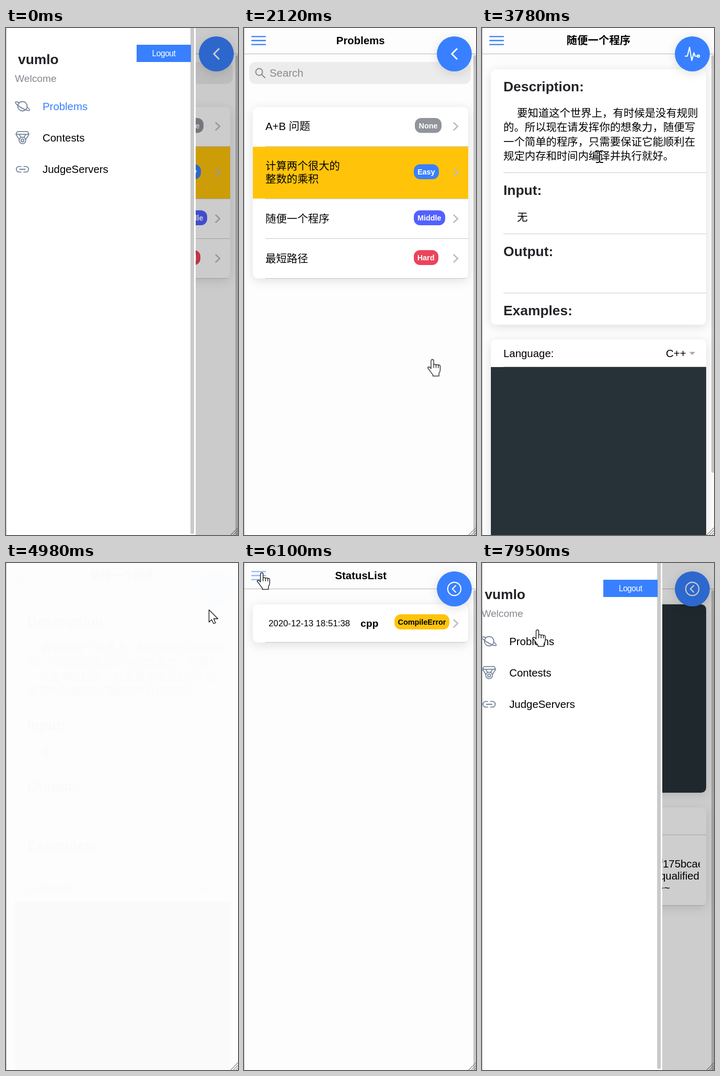
An HTML page that plays this animation: 444x969 px, repeating every 8 s.

```html
<!DOCTYPE html>
<html lang="zh-CN">
<head>
<meta charset="utf-8">
<title>Judge</title>
<style>
html, body { margin: 0; width: 100%; height: 100%; overflow: hidden; background: #fdfdfd; }
svg { display: block; }
text { font: 20.4px "Liberation Sans", Arial, "Noto Sans CJK SC", "Noto Sans CJK", sans-serif; white-space: pre; }
.b { font-weight: 700; }
.h { font-size: 26.4px; font-weight: 700; fill: #222428; }
.title { font-weight: 700; text-anchor: middle; }
.badge { font-size: 14.4px; font-weight: 700; fill: #fff; }
.card { fill: #fff; filter: drop-shadow(0 4.8px 9.6px rgba(0, 0, 0, .12)); }
.sep { fill: none; stroke: #c8c8ca; }
.line { fill: none; stroke-linecap: round; stroke-linejoin: round; }
.cursor path { fill: #fff; stroke: #111; stroke-width: 1.3; stroke-linejoin: round; }
</style>
</head>
<body>
<svg width="444" height="969" viewBox="0 0 444 969">
  <defs>
    <path id="bars" class="line" d="M15 16.3h26M15 24h26M15 31.7h26" stroke="#3880ff" stroke-width="2.3"/>
    <circle id="fab" class="card" cx="402.5" cy="49.5" r="33.5" style="fill:#3880ff"/>
    <path id="more" class="line" d="M-4-7L3.5 0L-4 7" stroke="#bdbdc0" stroke-width="2.5"/>
    <g id="back" class="line" stroke="#fff" stroke-width="32" transform="translate(385.7 32.7) scale(.0656)">
      <circle cx="256" cy="256" r="192"/><path d="M296 352l-96-96 96-96"/>
    </g>
    <clipPath id="msg"><path d="M41 520h376v134H41z"/></clipPath>
  </defs>

  <rect width="444" height="969" fill="#fdfdfd"/>
  <g id="chrome">
    <path d="M0 49.5h444" stroke="#b5b5b6"/>
    <rect id="bar" x="439" y="52" width="8" height="925" rx="3" fill="#c8c8c8"/>
  </g>

  <g id="list">
    <text class="title" x="223" y="31">Problems</text>
    <use href="#bars"/>
    <rect x="10" y="65" width="424" height="42" rx="12" fill="#ececed"/>
    <g class="line" stroke="#8a8a8d" stroke-width="2"><circle cx="29" cy="84" r="6.5"/><path d="M34 89l6 6"/></g>
    <text x="49" y="93" fill="#8a8a8d">Search</text>
    <rect class="card" x="17" y="151" width="412" height="327.500" rx="9.600"/>
    <path d="M17 227h412v99H17z" fill="#ffc409"/>
    <path class="sep" d="M41 226.500h388M41 326.500h388M41 402.500h388M41 478.500h383"/>
    <g id="rows"></g>
    <use href="#fab"/>
    <path class="line" d="M407.200 40L397.800 49.500L407.200 59" stroke="#fff" stroke-width="3"/>
  </g>

  <g id="problem">
    <text class="title" x="223" y="31">随便一个程序</text>
    <use href="#bars"/>
    <rect class="card" x="17" y="79" width="412" height="488" rx="9.600"/>
    <text class="h" x="41" y="121">Description:</text>
    <text x="67" y="169.500">要知道这个世界上，有时候是没有规则</text>
    <text x="41" y="197">的。所以现在请发挥你的想象力，随便写</text>
    <text x="41" y="224.500">一个简单的程序，只需要保证它能顺利在</text>
    <text x="41" y="251.500">规定内存和时间内编译并执行就好。</text>
    <text class="h" x="41" y="319">Input:</text>
    <text x="67" y="369">无</text>
    <text class="h" x="41" y="436">Output:</text>
    <text class="h" x="41" y="549">Examples:</text>
    <path class="sep" d="M41 276.500h388M41 393.500h388M41 506.500h388"/>
    <rect class="card" x="17" y="595" width="412" height="400" rx="9.600"/>
    <text x="41" y="629">Language:</text>
    <text x="352" y="629">C++</text>
    <path d="M397 619h11l-5.500 6z" fill="#aaa"/>
    <path class="sep" d="M41 647.500h388"/>
    <path d="M17 648h412v321H17z" fill="#263238"/>
    <use href="#fab"/>
    <g class="line" stroke="#fff" stroke-width="32" transform="translate(385.700 32.700) scale(.0656)">
      <path d="M48 320h64l64-256 64 384 64-224 32 96h64"/><circle cx="432" cy="320" r="32"/>
    </g>
  </g>

  <g id="status">
    <text class="title" x="223.500" y="31">StatusList</text>
    <use id="hover" href="#bars"/>
    <rect class="card" x="17" y="79" width="412" height="73" rx="9.600"/>
    <path class="sep" d="M41 151.500h383"/>
    <text x="47" y="121" style="font-size:16.800px">2020-12-13 18:51:38</text>
    <text class="b" x="223" y="122" style="font-size:19.200px">cpp</text>
    <rect x="288" y="98" width="105" height="29" rx="12" fill="#ffc409"/>
    <text class="badge" x="294.500" y="118" style="fill:#000">CompileError</text>
    <use href="#more" x="405.500" y="115.500"/>
    <use href="#fab"/><use href="#back"/>
  </g>

  <g id="detail">
    <text class="title" x="223" y="31">Status</text>
    <use href="#bars"/>
    <g id="result">
      <rect class="card" x="17" y="79" width="412" height="360" rx="9.600" style="fill:#263238"/>
      <rect class="card" x="17" y="467" width="412" height="188" rx="9.600"/>
      <path class="sep" d="M41 519.500h388M41 654.500h383"/>
      <text x="41" y="501">Message:</text>
      <g clip-path="url(#msg)">
        <text x="346" y="582" text-anchor="end">/judger/run/d40f</text><text x="346" y="582">175bcae02</text>
        <text x="340" y="605" text-anchor="end">1:1: error: expected un</text><text x="340" y="605">qualified</text>
        <text x="360" y="628" text-anchor="end">^~~~~~~~</text>
      </g>
    </g>
    <use href="#fab"/><use href="#back"/>
  </g>

  <path d="M430 969l14-14M435 969l9-9M440 969l4-4" stroke="#8c8c8c" stroke-width="1.200"/>

  <g id="loading">
    <rect width="444" height="969" opacity=".3"/>
    <rect x="104" y="447" width="242" height="76" rx="9.600" fill="#f6f6f6"/>
    <g id="spokes" class="line" stroke="#6a6a6d" stroke-width="2.600"></g>
    <text x="196" y="491" style="font-size:18.300px">Please wait...</text>
  </g>

  <rect id="shade" width="444" height="969"/>

  <g id="drawer">
    <path d="M0 0h363v969H0z" fill="#fff"/>
    <rect x="353" y="-8" width="7" height="975" rx="3" fill="#c9c9c9"/>
    <text class="h" x="23" y="69">vumlo</text>
    <text x="17" y="103" fill="#85878e" style="font-size:19.200px">Welcome</text>
    <path d="M250 32h104v33H250z" fill="#3880ff"/>
    <text x="302" y="54" text-anchor="middle" fill="#fff" style="font-size:15.600px;letter-spacing:-.03em">Logout</text>
    <text id="current" x="70" y="157">Problems</text>
    <text x="70" y="217">Contests</text>
    <text x="70" y="277">JudgeServers</text>
    <g class="line" stroke="#73849a" stroke-width="32">
      <g transform="translate(17.100 135.100) scale(.05625)">
        <path d="M413.500 284.500c58.900 47.200 91.600 89 80.300 108.500-17.900 30.900-138.800-5.500-270.100-81.100S.4 149.800 18.200 119c11.200-19.300 62.600-12.300 131.600 14.100"/>
        <circle cx="256" cy="256" r="160"/>
      </g>
      <g transform="translate(17.100 195.100) scale(.05625)">
        <path d="M147 323L42 159a32 32 0 0 1-2-31l31-62a32 32 0 0 1 29-18h312a32 32 0 0 1 29 18l31 62a32 32 0 0 1-2 31L365 323M37 144h438M305 250l66-106M140 144l67 106"/>
        <circle cx="256" cy="352" r="112"/><circle cx="256" cy="352" r="48"/>
      </g>
      <path transform="translate(17.100 255.600) scale(.05625)" d="M208 352h-64a96 96 0 0 1 0-192h64M304 160h64a96 96 0 0 1 0 192h-64M163 256h187"/>
    </g>
  </g>

  <path d="M.5 0v969" stroke="#bdbdbd"/>

  <g id="pointer" class="cursor">
    <path id="arrow" d="M.5.5v23.500l5-4.800 4 7.800 3.500-1.500-3.500-8h8z"/>
    <path id="hand" d="M-2.500 2.200a2.500 2.500 0 0 1 5 0v8.600q0-2 2.200-2 2.200 0 2.400 2 .3-1.600 2.200-1.500 2 .1 2.200 2 .4-1.200 1.900-1 1.800.2 1.800 2.400v5.500q0 4-1.600 6.200-1 1.600-1 3v4h-11.500v-2.500q-3-3-5-6.600-2.600-4-4-5-1.600-1.600-.3-2.800 2-1.400 4.500 1.200l1.200 1.500zM2.500 10v6M7.100 11v5M11.500 11.500v4.500"/>
    <path id="beam" d="M-7-11h5l2 2 2-2h5M0-9V9M-7 11h5l2-2 2 2h5" style="fill:none;stroke-width:2"/>
  </g>
</svg>

<script>
const LOOP = 8000;
const $ = id => document.getElementById(id);

// title lines, centre y, badge text, badge left, badge right, colour
const problems = [
  [['A+B 问题'], 188, 'None', 327, 378, '#92949c'],
  [['计算两个很大的', '整数的乘积'], 276.5, 'Easy', 325, 373, '#3880ff'],
  [['随便一个程序'], 364.5, 'Middle', 325, 385, '#5260ff'],
  [['最短路径'], 440.5, 'Hard', 325, 372, '#eb445a'],
];
$('rows').innerHTML = problems.map(([lines, y, level, left, right, color]) =>
  lines.map((s, i) => `<text x="41" y="${y + 7 + (i - (lines.length - 1) / 2) * 25}">${s}</text>`).join('') +
  `<rect x="${left}" y="${y - 16}" width="${right - left}" height="28.5" rx="12" fill="${color}"/>
   <text class="badge" x="${right - 7.5}" y="${y + 3.5}" text-anchor="end">${level}</text>
   <use href="#more" x="405.5" y="${y}"/>`).join('');

$('spokes').innerHTML = Array.from({ length: 12 }, (_, i) =>
  `<path d="M162 476v-6" transform="rotate(${i * 30} 162 485)" opacity="${(i + 3) / 15}"/>`).join('');

const start = document.timeline.currentTime;

// steps: [time, value, easing to the next step]; values hold by default
function play(id, prop, steps) {
  const frames = steps.map(([t, v, easing = 'step-end']) => ({ offset: t / LOOP, [prop]: v, easing }));
  const last = frames[frames.length - 1];
  if (last.offset < 1) frames.push({ ...last, offset: 1 });
  $(id).animate(frames, { duration: LOOP, iterations: Infinity }).startTime = start;
}
const fade = (id, ...steps) => play(id, 'opacity', steps);
const L = 'linear', OPEN = 'cubic-bezier(.32,.72,0,1)', CLOSE = 'cubic-bezier(.4,0,.6,1)';

// pages
fade('list', [0, 1], [2760, .5], [2860, 0]);
fade('problem', [0, 0], [3300, .6, L], [3400, 1], [4620, 1, L], [4960, .012], [5080, 0]);
fade('status', [0, 0], [5080, .1, L], [5340, 1], [6500, 1, L], [6580, 0]);
fade('detail', [0, 0], [6580, .4, L], [6750, 1]);
fade('result', [0, 0], [7030, .5], [7110, 1]);
fade('chrome', [0, 1], [4620, 1, L], [4960, 0], [5080, .2, L], [5340, 1]);
fade('loading', [0, 0], [3040, .005], [3140, .012], [3220, .6], [3300, .4], [3400, 0]);
fade('hover', [0, 1], [6020, .55], [6250, 1]);
play('bar', 'height', [[0, '925px'], [3300, '798px'], [4960, '925px']]);

// menu
const slide = x => `translateX(${x}px)`;
play('drawer', 'transform', [[0, slide(0)], [1640, slide(0), CLOSE], [2040, slide(-364)],
  [7760, slide(-363), OPEN], [8160 - 160, slide(-12)]]);
fade('shade', [0, .2], [1640, .2, CLOSE], [2040, 0], [7760, 0, OPEN], [8000, .195]);
play('current', 'fill', [[0, '#3880ff'], [2860, '#000']]);

// the opening is cut by the loop, so its own timing is kept at full length
$('drawer').getAnimations()[0].effect.setKeyframes([
  { offset: 0, transform: slide(0), easing: 'step-end' },
  { offset: 1640 / LOOP, transform: slide(0), easing: CLOSE },
  { offset: 2040 / LOOP, transform: slide(-364), easing: 'step-end' },
  { offset: 7760 / LOOP, transform: slide(-363), easing: 'cubic-bezier(.25,.62,.5,.97)' },
  { offset: 7950 / LOOP, transform: slide(-18), easing: L },
  { offset: 1, transform: slide(-10) },
]);

// pointer
const path = [
  [430, 422, 899, L], [760, 414, 806, L], [1090, 402, 750], [1460, 402, 749],
  [1960, 402, 749, 'ease-in-out'], [2400, 253, 336],
  [3780, 225, 246, 'ease-in'], [4520, 392, 70], [4720, 392, 70, L], [4900, 388, 89],
  [5440, 402, 100, L], [5640, 330, 150, L], [5840, 180, 110, L], [6100, 34, 19],
  [6180, 33, 20, L], [6450, 150, 110],
  [7310, 150, 110, L], [7580, 32, 22], [7760, 32, 22, L], [7950, 106, 128],
];
play('pointer', 'transform', [[0, 'translate(422px,899px)'],
  ...path.map(([t, x, y, e]) => [t, `translate(${x}px,${y}px)`, e])]);

const shapes = [[0, ''], [430, 'hand'], [2800, 'arrow'], [3780, 'beam'], [4200, 'arrow'], [4430, 'hand'],
  [4700, 'arrow'], [5440, 'hand'], [5640, 'arrow'], [5740, 'hand'], [5900, 'arrow'], [6020, 'hand'],
  [6230, 'arrow'], [6360, 'hand'], [6580, 'arrow'], [7540, 'hand']];
for (const id of ['arrow', 'hand', 'beam'])
  fade(id, ...shapes.map(([t, s]) => [t, +(s === id)]));
</script>
</body>
</html>
```
